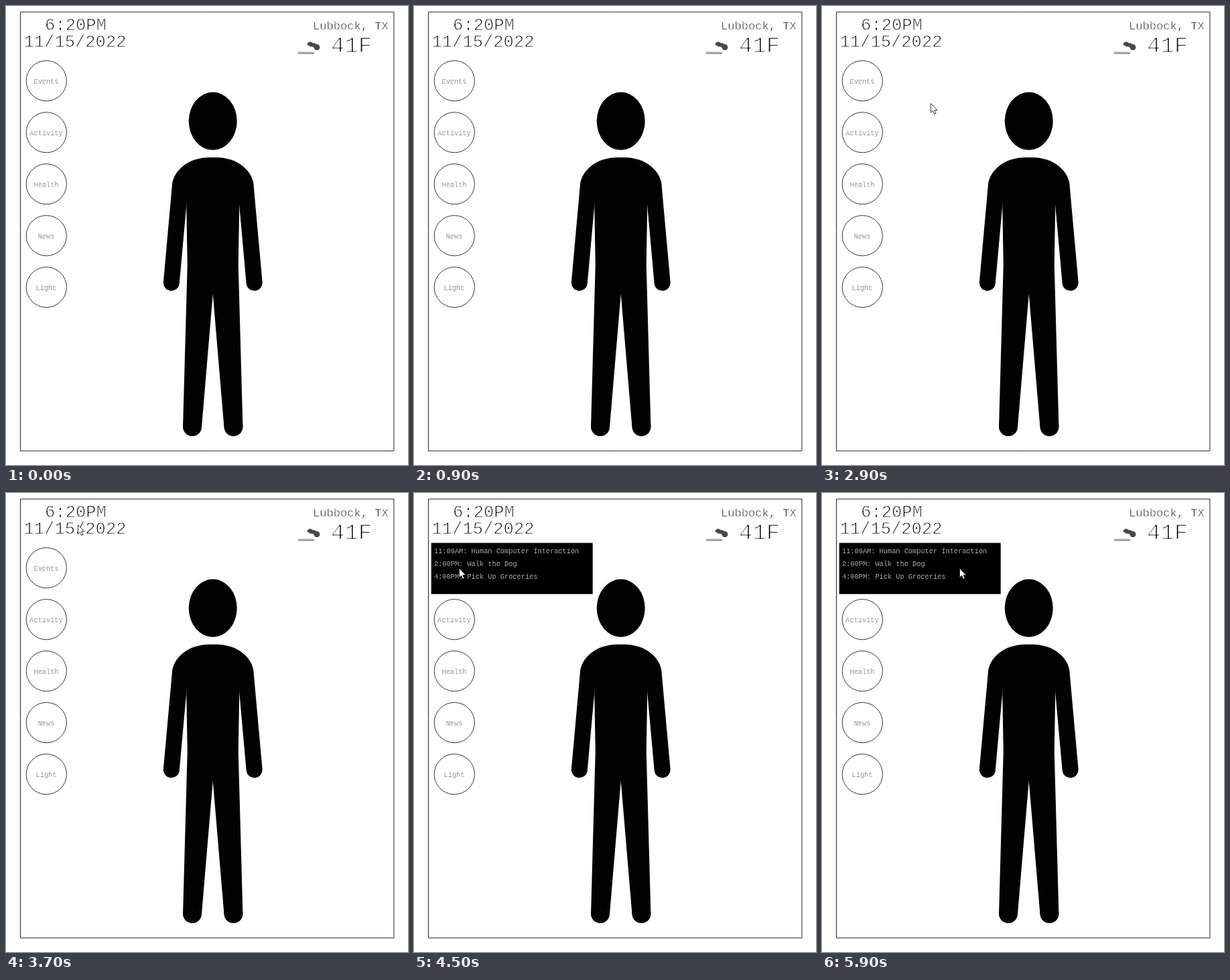
An HTML page with a canvas that plays this animation: 600x685 px, repeating every 8000 ms.

```html
<!DOCTYPE html>
<html lang="en">
<head>
<meta charset="utf-8">
<title>Smart mirror</title>
<style>
html, body { margin: 0; width: 100%; height: 100%; overflow: hidden; background: #fff; }
canvas { display: block; }
</style>
</head>
<body>
<canvas id="stage" width="600" height="685"></canvas>
<script>
const ctx = document.getElementById('stage').getContext('2d');
const LOOP = 8000;
const STEP = 200;
const PANEL_AT = 4500;
const FONT = '"Courier New", "Liberation Mono", monospace';
const MENU = ['Events', 'Activity', 'Health', 'News', 'Light'];
const EVENTS = ['11:00AM: Human Computer Interaction', '2:00PM: Walk the Dog', '4:00PM: Pick Up Groceries'];

// Each glide eases out from one point to the next, then rests there.
const GLIDES = [
  { at: 500, span: 200, from: [284, 91], to: [308, 102], power: 1, hide: 900 },
  { at: 2500, span: 400, from: [462, 280], to: [162, 145], power: 2 },
  { at: 3100, span: 400, from: [162, 145], to: [107, 46], power: 1.8 },
  { at: 3700, span: 400, from: [107, 47], to: [67, 112], power: 4 },
  { at: 5300, span: 600, from: [76, 112], to: [205, 112], power: 3 }
];

function pointerAt(t) {
  const glide = GLIDES.findLast(g => g.at <= t);
  if (!glide || t >= glide.hide) return null;
  const { at, span, from, to, power } = glide;
  const elapsed = Math.floor((t - at) / STEP) * STEP;
  const k = 1 - (1 - Math.min(1, elapsed / span)) ** power;
  return from.map((a, i) => Math.round(a + (to[i] - a) * k));
}

// Trims the letter stems with the background colour for a light typewriter weight.
function text(str, x, y, size, color, { align = 'left', back = '#fff', trim = 0.04 } = {}) {
  ctx.font = `${size}px ${FONT}`;
  ctx.textAlign = align;
  ctx.fillStyle = color;
  ctx.fillText(str, x, y);
  ctx.strokeStyle = back;
  ctx.lineWidth = size * trim;
  ctx.lineJoin = 'round';
  ctx.strokeText(str, x, y);
}

function disc(x, y, rx, ry = rx) {
  ctx.beginPath();
  ctx.ellipse(x, y, rx, ry, 0, 0, Math.PI * 2);
}

function polygon(...points) {
  ctx.beginPath();
  for (const [x, y] of points) ctx.lineTo(x, y);
  ctx.closePath();
}

function limbs() {
  ctx.lineWidth = 24;
  ctx.lineCap = 'round';
  ctx.beginPath();
  ctx.moveTo(-49, 270);
  ctx.lineTo(-61.9, 413);
  ctx.stroke();
  polygon([1, 280], [-39.8, 280], [-38, 386], [-44.7, 628], [-16.7, 628], [0, 430], [1, 430]);
  ctx.fill();
  disc(-30.7, 628, 14);
  ctx.fill();
}

function person() {
  ctx.fillStyle = ctx.strokeStyle = '#020202';
  ctx.save();
  ctx.translate(308.75, 0);
  disc(0, 171.8, 36, 43.2);
  ctx.fill();
  ctx.save();
  ctx.beginPath();
  ctx.rect(-70, 220, 140, 50);
  ctx.clip();
  ctx.beginPath();
  ctx.roundRect(-61, 226, 122, 90, { x: 56, y: 44 });
  ctx.fill();
  ctx.restore();
  ctx.fillRect(-40, 269, 80, 12);
  // Limbs stay below the shoulder curve.
  ctx.beginPath();
  ctx.rect(-100, 269.5, 200, 400);
  ctx.clip();
  limbs();
  ctx.scale(-1, 1);
  limbs();
  ctx.restore();
}

function weather() {
  ctx.fillStyle = '#484848';
  for (let i = 0; i < 3; i++) {
    disc(454 + i * 5, 58 + i * 1.8, 4.5);
    ctx.fill();
  }
  ctx.fillStyle = '#fff';
  for (let i = 0; i < 3; i++) {
    disc(441 + i * 7.5, 65, i === 1 ? 7 : 4.5);
    ctx.fill();
  }
  const shade = ctx.createLinearGradient(0, 67, 0, 71.5);
  shade.addColorStop(0, '#fff');
  shade.addColorStop(1, '#777');
  ctx.fillStyle = shade;
  ctx.beginPath();
  ctx.roundRect(435.5, 67.5, 25, 4, [0, 0, 2, 2]);
  ctx.fill();
}

function header() {
  text('6:20PM', 104, 36, 25.5, '#000', { align: 'center' });
  text('11/15/2022', 103, 61, 25.5, '#000', { align: 'center' });
  text('Lubbock, TX', 458, 35, 17.1, '#222', { trim: 0.032 });
  text('41F', 485, 69, 34, '#000', { trim: 0.045 });
  weather();
}

function menu(first) {
  for (let i = first; i < MENU.length; i++) {
    const y = 111.7 + i * 77;
    disc(60.3, y, 30.1);
    ctx.strokeStyle = '#333';
    ctx.lineWidth = 1;
    ctx.stroke();
    text(MENU[i], 60, y + 4.7, 10.3, '#777', { align: 'center', trim: 0.02 });
  }
}

function panel() {
  ctx.fillStyle = '#000';
  ctx.fillRect(25.7, 74.5, 241, 76.3);
  EVENTS.forEach((line, i) =>
    text(line, 30, 90.3 + i * 19, 10.3, '#ddd', { back: '#000', trim: 0.02 }));
}

function pointer(t) {
  const spot = pointerAt(t);
  if (!spot) return;
  ctx.save();
  ctx.translate(...spot);
  polygon([0.5, 0.5], [0.5, 14], [3.6, 11.2], [5.8, 16.3], [8, 15.4], [5.9, 10.4], [10, 10.4]);
  ctx.fillStyle = '#fff';
  ctx.fill();
  ctx.strokeStyle = '#222';
  ctx.lineWidth = 0.9;
  ctx.lineJoin = 'miter';
  ctx.stroke();
  ctx.restore();
}

function draw(t) {
  const open = t >= PANEL_AT;
  ctx.fillStyle = '#fff';
  ctx.fillRect(0, 0, 600, 685);
  ctx.strokeStyle = '#222';
  ctx.lineWidth = 1;
  ctx.strokeRect(21.5, 9, 557.5, 655);
  header();
  person();
  menu(open ? 1 : 0);
  if (open) panel();
  pointer(t);
}

const start = performance.now();
function tick() {
  draw((performance.now() - start) % LOOP);
  requestAnimationFrame(tick);
}
tick();
</script>
</body>
</html>
```
